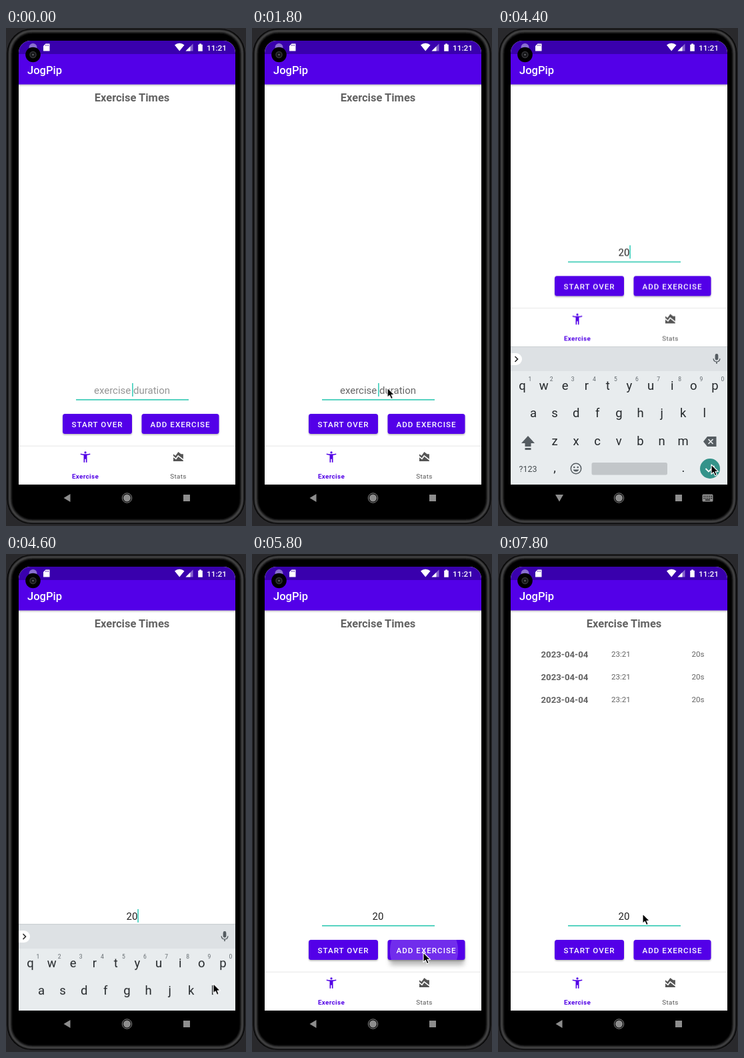
These frames come from a looping animation (360x746 px, 8 s). An HTML page:

```html
<!DOCTYPE html>
<html lang="en">
<head>
<meta charset="utf-8">
<title>Exercise log</title>
<style>
html, body { margin: 0; width: 100%; height: 100%; overflow: hidden; background: #29292c; }
svg { display: block; width: 100vw; height: 100vh; font-family: Roboto, sans-serif; }
.mid { text-anchor: middle; }
.bold { font-weight: 700; }
.button { font: 500 11.6px Roboto, sans-serif; letter-spacing: 1.02px; fill: #fff; }
.label { font-size: 9.9px; letter-spacing: .33px; }
.field { font-size: 15px; }
.accent { fill: #5200e6; }
.grey { fill: #636363; }

/* One 8 s clock for everything; 1% is 80 ms. */
.a { animation: 8s step-end -20ms infinite; }
.smooth { animation-timing-function: linear; }
.lift { animation-name: lift; }
.resting { animation-name: resting; }
.typing { animation-name: typing; }
.keyboard { animation-name: keyboard; }
.suggest { animation-name: suggest; }
.hint { animation-name: hint; }
.hint-caret { animation-name: hint-caret; }
.two { animation-name: two; }
.twenty { animation-name: twenty; }
.caret { animation: blink 1s step-end -20ms infinite; }
.check { animation-name: check; }
.pointer { animation-name: pointer; animation-timing-function: ease-in-out; }
.seen { animation-name: seen; }
.row1 { animation-name: row1; }
.row2 { animation-name: row2; }
.row3 { animation-name: row3; }
.ripple { animation-name: ripple; }
.raised { animation-name: raised; }

@keyframes lift { 0%, 57.5% { transform: none; } 25% { transform: translateY(-206.5px); } }
@keyframes resting { 0%, 57.5% { opacity: 1; } 25% { opacity: 0; } }
@keyframes typing { 0%, 57.5% { opacity: 0; } 25% { opacity: 1; } }
@keyframes keyboard {
  0%, 23.75% { transform: translateY(208px); animation-timing-function: ease-out; }
  27%, 56.25% { transform: none; animation-timing-function: ease-in; }
  59%, 100% { transform: translateY(208px); }
}
@keyframes suggest { 0% { opacity: 1; } 37.5% { opacity: 0; } }
@keyframes hint { 0%, 25% { fill: #959595; opacity: 1; } 17.5% { fill: #666; } 37.5% { opacity: 0; } }
@keyframes hint-caret {
  0%, 7.5%, 20%, 35% { opacity: 1; }
  1.25%, 13.75%, 28.75%, 37.5% { opacity: 0; }
}
@keyframes two { 0%, 40% { opacity: 0; } 37.5% { opacity: 1; } }
@keyframes twenty { 0% { opacity: 0; } 40% { opacity: 1; } }
@keyframes blink { 0%, 70% { opacity: 0; } 20% { opacity: 1; } }
@keyframes check { 0%, 57.5% { fill: #40a89c; } 53.75% { fill: #34938a; } }
@keyframes seen { 0% { opacity: 0; } 10% { opacity: 1; } }
@keyframes pointer {
  0%, 10% { transform: translate(330px, 600px); }
  16.25%, 22.5% { transform: translate(203px, 539px); }
  32.5%, 46.25% { transform: translate(288.5px, 480px); }
  52.5%, 56.25% { transform: translate(320px, 654px); }
  60% { transform: translate(293px, 623px); }
  67.5%, 88.75% { transform: translate(257px, 597px); }
  95%, 100% { transform: translate(217px, 539px); }
}
@keyframes row1 { 0% { opacity: 0; } 75% { opacity: 1; } }
@keyframes row2 { 0% { opacity: 0; } 82.5% { opacity: 1; } }
@keyframes row3 { 0% { opacity: 0; } 90% { opacity: 1; } }
@keyframes ripple {
  0%, 70.6%, 75.5%, 78.1%, 83%, 85.6%, 90.5%, 100% { r: 10px; opacity: 0; }
  70.7%, 78.2%, 85.7% { r: 10px; opacity: 1; }
  72.7%, 80.2%, 87.7% { r: 50px; opacity: 1; }
  73.7%, 81.2%, 88.7% { r: 68px; opacity: .7; }
}
@keyframes raised {
  0%, 70.6%, 75.5%, 78.1%, 83%, 85.6%, 90.5%, 100% { opacity: 0; }
  72%, 73.5%, 79.5%, 81%, 87%, 88.5% { opacity: 1; }
}
</style>
</head>
<body>
<svg viewBox="0 0 360 746" preserveAspectRatio="none">
  <defs>
    <clipPath id="screen"><path d="M19 683.8V37a18 18 0 0 1 18-18H326a18 18 0 0 1 18 18V683.800z"/></clipPath>
    <clipPath id="add"><rect x="203.500" y="578" width="116" height="30" rx="3.500"/></clipPath>
    <linearGradient id="fade" x2="0" y2="1">
      <stop stop-color="#000" stop-opacity=".25"/><stop offset="1" stop-color="#000" stop-opacity="0"/>
    </linearGradient>
    <filter id="low" x="-10%" y="-20%" width="120%" height="160%">
      <feDropShadow dx="0" dy="1.500" stdDeviation="1" flood-opacity=".28"/>
    </filter>
    <filter id="soft" x="-20%" y="-60%" width="140%" height="240%"><feGaussianBlur stdDeviation="3.500"/></filter>
    <filter id="gloss"><feGaussianBlur stdDeviation=".8"/></filter>
  </defs>

  <!-- Phone body -->
  <rect x="1.500" y="1" width="357" height="742" rx="37"/>
  <g fill="none" filter="url(#gloss)">
    <rect x="6" y="5" width="348" height="734" rx="33" stroke="#2d2d2e" stroke-width="5"/>
    <rect x="5" y="4" width="350" height="736" rx="34" stroke="#5a5a5b" stroke-width="1.500"/>
  </g>

  <g clip-path="url(#screen)">
    <path d="M19 19h325v665H19z" fill="#fff"/>
    <g class="a resting grey">
      <text class="mid bold" x="189" y="110" font-size="16.500">Exercise Times</text>
      <g id="rows"></g>
    </g>

    <g class="a lift">
      <g class="field mid">
        <text class="a hint" x="189" y="548">exercise duration</text>
        <text class="a two" x="189" y="548" fill="#222">2</text>
        <text class="a twenty" x="189" y="548" fill="#222">20</text>
        <path class="a hint-caret" d="M189 532h1.800v20h-1.800z" fill="#4fd3c2"/>
        <path class="a two" d="M193.500 532h1.800v20h-1.800z" fill="#4fd3c2"/>
        <g class="a twenty"><path class="caret" d="M197.200 532h1.800v20h-1.800z" fill="#4fd3c2"/></g>
      </g>
      <path d="M105 556h169v1.700H105z" fill="#42cdb9"/>

      <rect class="a smooth raised" x="207" y="586" width="111" height="30" rx="4" fill="#000" fill-opacity=".27" filter="url(#soft)"/>
      <g fill="#5300e8" filter="url(#low)">
        <rect x="85" y="578" width="104" height="30" rx="3.500"/>
        <rect x="203.500" y="578" width="116" height="30" rx="3.500"/>
      </g>
      <g clip-path="url(#add)">
        <circle class="a smooth ripple" cx="258" cy="594" r="10" fill="#fff" fill-opacity=".18"/>
      </g>
      <text class="button" x="98.500" y="598">START OVER</text>
      <text class="button" x="216.500" y="598">ADD EXERCISE</text>

      <path d="M19 627h325v57H19z" fill="#fff"/>
      <path d="M19 625.500h325v1.500H19z" fill="#eee"/>
      <path class="accent" transform="translate(109.100 632.500) scale(.827)" d="M20.500 6c-2.610.7-5.670 1-8.500 1s-5.890-.3-8.500-1L3 8c1.860.5 4 .83 6 1v13h2v-6h2v6h2V9c2-.17 4.140-.5 6-1zM12 6a2 2 0 1 0 0-4 2 2 0 0 0 0 4z"/>
      <path fill="#555" transform="translate(248.500 632.500) scale(.827)" d="M3 13v7h18v-1.500l-9-7L8 17zM3 7l4 3 5-7 5 4h4v9l-9.400-7.300-4 5.500L3 10.400z"/>
      <text class="mid label bold accent" x="119" y="675">Exercise</text>
      <text class="mid label" x="258.500" y="675" fill="#555">Stats</text>
    </g>

    <g class="a keyboard">
      <path d="M19 477h325v207H19z" fill="#e8ecee"/>
      <path d="M19 477h325v37H19z" fill="#dde1e4"/>
      <path d="M19 477h325v1H19z" fill="#cbd0d3"/>
      <path d="M19 487h8a9 9 0 0 1 0 18h-8z" fill="#fff"/>
      <path d="M25.500 492l4 4-4 4" fill="none" stroke="#222" stroke-width="1.600"/>
      <g class="a suggest mid" font-size="14.500" fill="#596066">
        <path d="M133.500 486h1v20h-1zM227.500 486h1v20h-1z" fill="#c2c7ca"/>
        <text x="91" y="502">thanks</text><text x="181" y="502">I</text><text x="269" y="502">we</text>
      </g>
      <path fill="#555c61" transform="translate(318.500 486.500) scale(.79)" d="M12 14a3 3 0 0 0 3-3V5a3 3 0 0 0-6 0v6a3 3 0 0 0 3 3zm5.300-3a5.300 5.300 0 0 1-10.600 0H5a7 7 0 0 0 6 6.700V21h2v-3.300a7 7 0 0 0 6-6.700z"/>
      <g id="keys" class="mid" font-size="18.500" fill="#25292c"></g>
      <g fill="#555c61">
        <path d="M45 611l10 11h-5.500v5h-9v-5H35zM40.500 629h9v3h-9z"/>
        <path d="M314 612h13.500v15H314l-6-7.500z"/>
        <path d="M315.500 616l7 7m0-7l-7 7" stroke="#e8ecee" stroke-width="1.700"/>
        <circle cx="117" cy="660" r="7.700" fill="none" stroke="#555c61" stroke-width="1.500"/>
        <circle cx="114.300" cy="658" r="1.300"/><circle cx="119.700" cy="658" r="1.300"/>
        <path d="M112.700 661.500h8.600a4.500 4.200 0 0 1-8.600 0z"/>
      </g>
      <rect x="140.500" y="651" width="113.500" height="18.500" rx="2.500" fill="#c2c6c9"/>
      <text class="mid" x="45" y="665" font-size="12.500" fill="#444a4e">?123</text>
      <circle class="a check" cx="318" cy="660" r="15"/>
      <path d="M311.500 660l4.500 4.500 8.500-8.500" fill="none" stroke="#fff" stroke-width="1.800"/>
    </g>

    <!-- App bar and status bar -->
    <path d="M19 84h325v4H19z" fill="url(#fade)"/>
    <path d="M19 38h325v46.500H19z" fill="#5300e8"/>
    <path d="M19 19h325v20H19z" fill="#3900ad"/>
    <text x="32" y="69" font-size="16.500" font-weight="500" fill="#fff">JogPip</text>
    <circle cx="40.500" cy="29" r="6" fill="#8a70cf"/>
    <g fill="#fff">
      <path d="M59.500 23.500h6v11h-9.500v-7.500z"/>
      <path d="M253 25.500a11 11 0 0 1 14.500 0L260.200 34.500z"/>
      <path d="M280.500 23.500v11h-11z" opacity=".4"/><path d="M276.500 27.500v7h-7z"/>
      <path d="M290 23.500h3v1.200h1.800v10h-6.600v-10h1.800z"/>
      <text x="301" y="33.500" font-size="11.800" font-weight="500">11:21</text>
    </g>
    <path d="M59.500 25v2m2-2v2m2-2v2" stroke="#3900ad" stroke-width=".7"/>
  </g>

  <circle cx="40.500" cy="40" r="11.300"/>
  <circle cx="40.500" cy="40" r="4.500" fill="#17181a" stroke="#343538" stroke-width="1.500"/>
  <circle cx="40.500" cy="40" r="1.300" fill="#606166"/>

  <!-- System navigation -->
  <g fill="#8d8d8d">
    <path class="a resting" d="M86.500 704l10-6v12z"/>
    <path class="a typing" d="M86 699h12l-6 10.500z"/>
    <circle cx="181.500" cy="704" r="5.500"/>
    <circle cx="181.500" cy="704" r="7.200" fill="none" stroke="#8d8d8d"/>
    <path d="M266 699h10v10h-10z"/>
    <g class="a typing">
      <rect x="306.500" y="698.500" width="16" height="11" rx="1.500"/>
      <path d="M308.500 701.500h12.500m-12.500 3h12.500" stroke="#000" stroke-width="1.300" stroke-dasharray="1.300 1.500"/>
      <path d="M311 707h7" stroke="#000" stroke-width="1.200"/>
    </g>
  </g>

  <g class="a seen"><g class="a pointer">
    <path d="M0 0v14.500l3.300-3 2.300 5.200 2.700-1.200-2.300-5H10.500z" stroke="#fff" stroke-width="1.100" stroke-linejoin="round"/>
  </g></g>
</svg>
<script>
const label = (x, y, text, extra = "") => `<text x="${x}" y="${y}" ${extra}>${text}</text>`;

const keyRow = (letters, x, y) =>
  [...letters].map((letter, i) => label(x + i * 32.1, y, letter)).join("");

const digits = [..."1234567890"]
  .map((digit, i) => label(48 + i * 32.1, 528.5, digit, 'font-size="8.5" fill="#61686d"'))
  .join("");

document.getElementById("keys").innerHTML =
  keyRow("qwertyuiop", 36.5, 542) + digits +
  keyRow("asdfghjkl", 53, 583) +
  keyRow("zxcvbnm", 85, 625) +
  label(85, 665, ",") + label(278, 665, ".");

document.getElementById("rows").innerHTML = [0, 1, 2].map(i => {
  const y = 154 + i * 34;
  return `<g class="a row${i + 1}" font-size="11.6">` +
    label(64.5, y + 1, "2023-04-04", 'class="bold" font-size="13.2"') +
    label(170, y - .5, "23:21") + label(290.5, y - .5, "20s") + "</g>";
}).join("");
</script>
</body>
</html>
```
